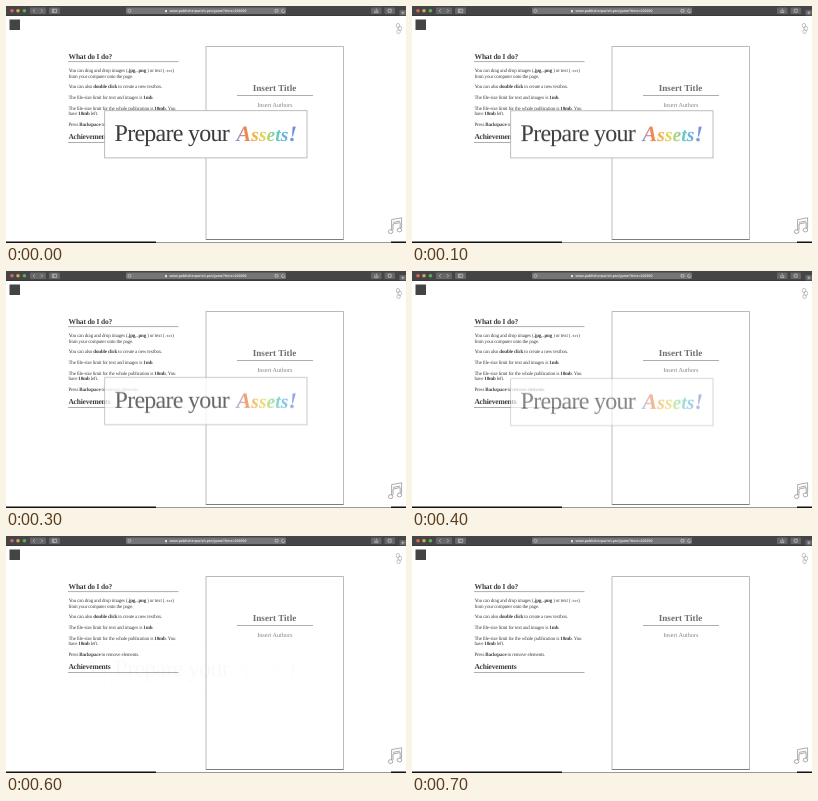
An HTML page that plays this animation: 400x237 px, repeating every 1 s.

```html
<!DOCTYPE html>
<html lang="en">
<head>
<meta charset="utf-8">
<title>Prepare your Assets</title>
<style>
  html, body { margin: 0; width: 100%; height: 100%; overflow: hidden; background: #fff; }
  svg { display: block; width: 400px; height: 237px; }
  text { font-family: "Liberation Serif", "Times New Roman", serif; text-rendering: geometricPrecision; fill: #3c3c3c; }
  .b { font-weight: bold; }
  .body text { font-size: 5px; letter-spacing: -.15px; }
  .head { font-size: 7.5px; font-weight: bold; letter-spacing: -.2px; }
  .mono { font-family: "Liberation Mono", monospace; font-size: 3.7px; letter-spacing: -.2px; }
  .url { font: bold 3.6px "Liberation Sans", Arial, sans-serif; fill: #e4e4e4; }
  .line { fill: none; stroke: #999; stroke-width: .8; }
  .icon { fill: none; stroke: #aaa; stroke-width: .7; }
  .bar { stroke: #ccc; }
  .notes { stroke: #888; }
  .page { fill: #fff; stroke: #aaa; stroke-width: .8; }
  .title { fill: #707070; }
  .authors { fill: #858585; }
  .assets { font-style: italic; font-weight: bold; fill: url(#rainbow); }
</style>
</head>
<body>
<svg viewBox="0 0 400 237">
  <defs>
    <linearGradient id="rainbow" gradientUnits="userSpaceOnUse" x1="230" y1="133" x2="292" y2="125">
      <stop offset="0" stop-color="#7f9bd6"/>
      <stop offset=".09" stop-color="#c08a9c"/>
      <stop offset=".18" stop-color="#f0884a"/>
      <stop offset=".32" stop-color="#f4b545"/>
      <stop offset=".46" stop-color="#e2d85a"/>
      <stop offset=".58" stop-color="#8cd48c"/>
      <stop offset=".7" stop-color="#5cc6d4"/>
      <stop offset=".83" stop-color="#6aa4e0"/>
      <stop offset="1" stop-color="#7c82dc"/>
    </linearGradient>
  </defs>
  <rect width="400" height="237" fill="#fff"/>

  <!-- browser bar -->
  <rect width="400" height="10" fill="#454547"/>
  <rect y="9.3" width="400" height=".7" fill="#333"/>
  <circle cx="6" cy="4.8" r="1.8" fill="#d9655c"/>
  <circle cx="12" cy="4.8" r="1.8" fill="#cfa94c"/>
  <circle cx="18.4" cy="4.8" r="1.8" fill="#62ac58"/>
  <g fill="#666668">
    <rect x="24" y="1.6" width="16" height="6.4" rx="1"/>
    <rect x="43" y="1.6" width="11" height="6.4" rx="1"/>
    <rect x="120" y="1.6" width="160" height="6.4" rx="1.2" fill="#757577"/>
    <rect x="365" y="1.6" width="10.5" height="6.4" rx="1"/>
    <rect x="378.5" y="1.6" width="10.5" height="6.4" rx="1"/>
    <rect x="393.5" y="4" width="6.5" height="5.4"/>
  </g>
  <g class="icon bar">
    <path d="M28.8 3.2L27.2 4.8l1.6 1.6M35 3.2l1.6 1.6L35 6.4"/>
    <path d="M46.3 3.2h4.4v3.2h-4.4zM47.8 3.2v3.2"/>
    <circle cx="123.5" cy="4.8" r="1.5"/>
    <path d="M269 3.6h3v2.4h-3z"/>
    <path d="M277.6 3.6a1.5 1.5 0 1 0 1 1.3"/>
    <path d="M368.8 4.2v2.4h3V4.2M370.3 5.6V2.6"/>
    <path d="M382.2 3.2h3v3h-3z"/>
    <path d="M395.4 6.8h3M396.9 5.3v3"/>
  </g>
  <rect x="159" y="4" width="2" height="2.2" fill="#ddd"/>
  <text class="url" x="202" y="6.1" text-anchor="middle">www.publisherparish.pro/game?time=100000</text>

  <!-- corner marks -->
  <rect x="3.5" y="13.5" width="10.5" height="10.5" fill="#444"/>
  <g class="icon">
    <ellipse cx="392" cy="19.6" rx="1.7" ry="2.2"/>
    <ellipse cx="393.8" cy="22.4" rx="1.9" ry="2.2"/>
    <ellipse cx="392.6" cy="25.6" rx="1.7" ry="2"/>
  </g>
  <g class="icon notes">
    <path d="M385.6 224v-10.4l10-1.8v10.6M387 224v-6l7.2-1.4v6M387 216.4l7.2-1.4"/>
    <ellipse cx="384.6" cy="225.6" rx="2.3" ry="1.9"/>
    <ellipse cx="393.4" cy="224" rx="2.3" ry="1.9"/>
  </g>

  <!-- instructions -->
  <text class="head" x="62.6" y="52.8">What do I do?</text>
  <path class="line" d="M62 55.6H172.5M62 136.5H172.5"/>
  <g class="body">
    <text x="62.4" y="66">You can drag and drop images (<tspan class="b">.jpg, .png</tspan> ) or text (<tspan class="mono">.txt</tspan>)</text>
    <text x="62.4" y="71.8">from your computer onto the page.</text>
    <text x="62.4" y="82">You can also <tspan class="b">double click</tspan> to create a new textbox.</text>
    <text x="62.4" y="93">The file-size limit for text and images is <tspan class="b">1mb</tspan>.</text>
    <text x="62.4" y="103.6">The file-size limit for the whole publication is <tspan class="b">10mb</tspan>. You</text>
    <text x="62.4" y="108.9">have <tspan class="b">10mb</tspan> left.</text>
    <text x="62.4" y="119.8">Press <tspan class="b">Backspace</tspan> to remove elements.</text>
  </g>
  <text class="head" x="62.4" y="133.4">Achievements</text>

  <!-- blank page -->
  <rect class="page" x="200" y="40.6" width="137.4" height="192.8"/>
  <path d="M200 233.5H337.5" stroke="#777" stroke-width=".9"/>
  <text class="b title" x="268.5" y="85.4" font-size="9.15" text-anchor="middle">Insert Title</text>
  <path class="line" d="M231 89.5H307"/>
  <text class="authors" x="268.8" y="101.3" font-size="6.2" text-anchor="middle">Insert Authors</text>

  <!-- window edge -->
  <rect y="236" width="400" height="1" fill="#999"/>
  <path d="M0 236.3H150M385 236.3H400" stroke="#111" stroke-width="1.4"/>

  <g id="notice">
    <rect x="98.7" y="104.7" width="202.3" height="47.2" fill="#fff" stroke="#aaa" stroke-width=".8"/>
    <text x="108.6" y="135.2" font-size="24" letter-spacing="-.75">Prepare your</text>
    <text class="assets" x="230.5" y="135.2" font-size="22">A<tspan font-size="19.5" letter-spacing=".1">ssets</tspan>!</text>
  </g>
</svg>
<script>
  const LOOP = 1000;
  // time in ms, opacity, drop in px
  const steps = [
    [0, 1, 0], [100, .99, .1], [200, .96, .3], [300, .78, 1.8],
    [400, .62, 2.8], [500, .18, 4.8], [600, .03, 5.3], [700, 0, 5.5], [LOOP, 0, 5.5]
  ];
  const frames = steps.map(([time, opacity, drop]) => ({
    offset: time / LOOP,
    opacity,
    transform: `translateY(${drop}px)`,
    easing: "steps(1, end)"
  }));
  document.getElementById("notice").animate(frames, { duration: LOOP, iterations: Infinity });
</script>
</body>
</html>
```
